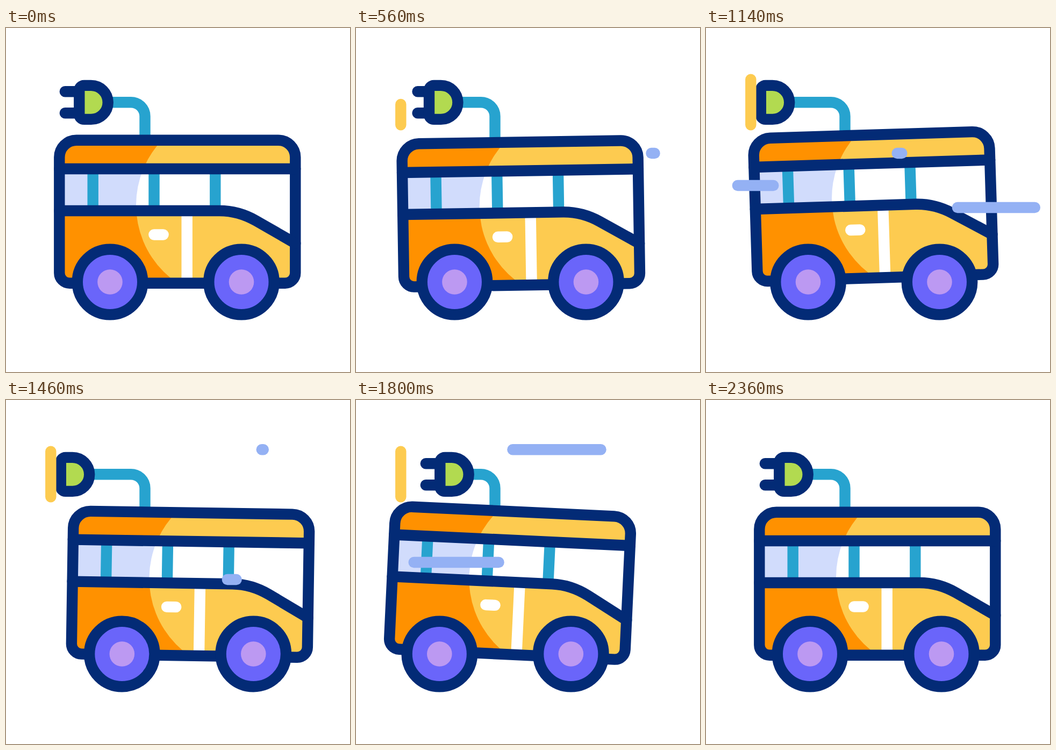
Recreate the animation shown at these times as an HTML page without scripts. Size 640 by 640 pixels, loop 2.4 s.

```html
<!DOCTYPE html>
<html lang="en">
<head>
<meta charset="utf-8">
<title>Electric bus</title>
<style>
  @property --head { syntax: "<length>"; inherits: false; initial-value: 0px; }
  @property --tail { syntax: "<length>"; inherits: false; initial-value: 0px; }

  html, body { margin: 0; width: 100%; height: 100%; overflow: hidden; background: #fff; }
  svg { display: block; width: 100%; height: 100%; }

  .line { fill: none; stroke-width: 20.4; stroke-linecap: round; stroke-linejoin: round; }
  .navy { stroke: #032b76; }
  .teal { stroke: #27a3cf; stroke-linecap: butt; }

  .bus, .body, .plug, .prongs, .socket, .dash {
    animation-duration: 2400ms;
    animation-iteration-count: infinite;
    animation-timing-function: cubic-bezier(.333, 0, .667, 1);
  }
  .bus { animation-name: drive; }
  .body { animation-name: bounce, tilt; transform-origin: 318.5px 472.5px; }
  .plug { animation-name: plug; }
  .prongs { animation-name: prongs; }

  /* Strokes drawn between --tail and --head */
  .socket, .dash {
    visibility: hidden;
    stroke-dasharray: calc(var(--head) - var(--tail)) 999px;
    stroke-dashoffset: calc(0px - var(--tail));
  }
  .socket { stroke: #fdcb50; animation-name: socket, socket-show; }
  .dash { stroke: #94b1f4; animation-name: head, tail, dash-show; animation-delay: var(--at); }

  @keyframes drive {
    0%, 17.3% { translate: 0; }
    37.3% { translate: -45.5px; }
    56.7% { translate: 32px; }
    74.6% { translate: -38.2px; }
    98.3%, 100% { translate: 0; }
  }
  @keyframes tilt {
    0%, 15% { rotate: 0deg; }
    37% { rotate: -2.75deg; }
    76% { rotate: 2.7deg; }
    98.3%, 100% { rotate: 0deg; }
  }
  @keyframes bounce {
    0%, 12.5% { translate: 0 0; }
    37.5% { translate: 0 9px; }
    48% { translate: 0 -10px; }
    60.8% { translate: 0 1px; }
    75% { translate: 0 -1.5px; }
    98.3%, 100% { translate: 0 0; }
  }
  @keyframes plug {
    0% { translate: 0; }
    17.5% { translate: 20px; }
    31.7%, 60.8% { translate: -34.5px; }
    75% { translate: 20px; }
    98.3%, 100% { translate: 0; }
  }
  @keyframes prongs {
    0%, 17.5% { translate: 0; }
    31.7%, 60.8% { translate: 13.5px; }
    75%, 100% { translate: 0; }
  }
  @keyframes socket {
    0%, 18.7% { --head: 0px; }
    28.7%, 89.2% { --head: 84.6px; }
    97.9%, 100% { --head: 0px; }
  }
  @keyframes socket-show {
    0%, 18.6% { visibility: hidden; }
    18.7%, 97.8% { visibility: visible; }
    97.9%, 100% { visibility: hidden; }
  }
  @keyframes head {
    0% { --head: 0px; }
    18.3%, 100% { --head: 200px; }
  }
  @keyframes tail {
    0%, 12.1% { --tail: 0px; }
    28.1%, 100% { --tail: 200px; }
  }
  @keyframes dash-show {
    0%, 28% { visibility: visible; }
    28.1%, 100% { visibility: hidden; }
  }
</style>
</head>
<body>
<svg viewBox="0 0 640 640">
  <defs>
    <path id="shell" d="M131 208.7H506.5a31.8 31.8 0 0 1 31.8 31.8V455.7a19 19 0 0 1-19 19H118.3a19 19 0 0 1-19-19V240.5a31.8 31.8 0 0 1 31.7-31.8z"/>
    <path id="glass" d="M99.3 262H538.3V400.6L465 358.5C444 346.5 421 340 397 340H99.3z"/>
    <path id="shine" d="M640 154H417.5a175.5 175.5 0 0 0 0 351H640z"/>
    <clipPath id="in-shell"><use href="#shell"/></clipPath>
    <clipPath id="in-glass"><use href="#glass"/></clipPath>
    <g id="wheel">
      <circle r="60.7" fill="#6a65fa" class="navy" stroke-width="20.4"/>
      <circle r="23.3" fill="#bc99f2"/>
    </g>
  </defs>

  <path class="line teal" d="M156 138.2H232.5a26 26 0 0 1 26 26V226"/>
  <g class="plug">
    <path class="line navy prongs" d="M109.8 118.3H136M109.8 158.3H136"/>
    <path class="line navy" style="fill:#b2da50" d="M145.3 106.9H158.2a31.5 31.5 0 0 1 0 63H145.3a9 9 0 0 1-9-9V115.9a9 9 0 0 1 9-9z"/>
  </g>
  <path class="line socket" d="M83.3 180.2v-84.6"/>

  <g class="bus">
    <g class="body">
      <g clip-path="url(#in-shell)">
        <use href="#shell" fill="#ff9100"/>
        <use href="#shine" fill="#fdcb50"/>
      </g>
      <path class="line" stroke="#fff" style="stroke-linecap:butt" d="M336.7 340V474"/>
      <g clip-path="url(#in-glass)">
        <use href="#glass" fill="#d1dcfc"/>
        <use href="#shine" fill="#fff"/>
      </g>
      <path class="line teal" d="M161.7 262v78M275.5 262v78M389.3 262v78"/>
      <path class="line" stroke="#fff" d="M275.4 384.5h17.2"/>
      <use href="#shell" class="line navy"/>
      <path class="line navy" d="M99.3 262H538.3M99.3 340H397C421 340 444 346.5 465 358.5L538.3 400.6"/>
    </g>
    <use href="#wheel" x="193.5" y="472.5"/>
    <use href="#wheel" x="438" y="472.5"/>
  </g>

  <path class="line dash" style="--at:515ms" d="M555.6 233h-200"/>
  <path class="line dash" style="--at:615ms" d="M258.8 293h-200"/>
  <path class="line dash" style="--at:855ms" d="M611.8 334h-200"/>
  <path class="line dash" style="--at:1429ms" d="M478.8 92.2h-200"/>
  <path class="line dash" style="--at:1488ms" d="M267.6 302h-200"/>
</svg>
</body>
</html>
```
